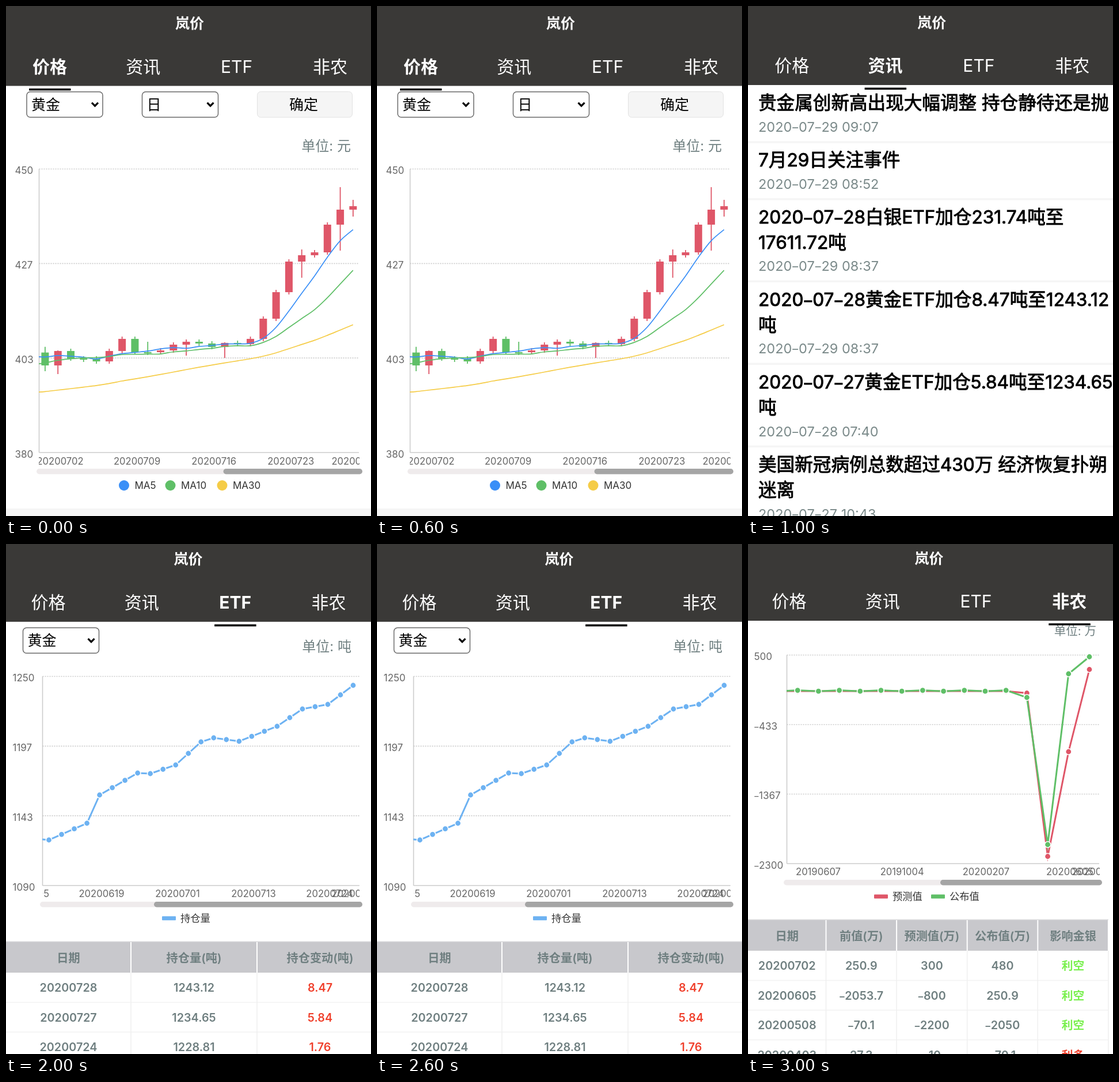
Recreate the animation shown at these times as an HTML page. Size 634 px wide and 884 px high, loop 4000 ms.

```html
<!DOCTYPE html>
<html lang="zh-CN">
<head>
<meta charset="utf-8">
<style>
html, body { margin: 0; width: 100%; height: 100%; overflow: hidden; background: #fff; }
svg { display: block; }
text { font-family: Inter, "Noto Sans CJK SC", "Noto Sans CJK", sans-serif; white-space: pre; }
.dash { font-family: "Open Sans", sans-serif; }
</style>
</head>
<body>
<svg id="stage" width="634" height="884" viewBox="0 0 634 884"></svg>
<script>
const RED = '#df5668', GREEN = '#5fbf67', BLUE = '#3a8ff7', YELLOW = '#f5cc47', SKY = '#6db2f2';
const SLATE = '#6f7f80', AXIS = '#666';

const range = (n, f) => Array.from({ length: n }, (_, i) => f(i));

// y is the baseline; hyphens are set as wider dashes
const text = (x, y, s, size, fill = '#000', weight = 400, anchor = 'start', extra = '') =>
  `<text x="${x}" y="${y}" font-size="${size}" fill="${fill}" font-weight="${weight}" text-anchor="${anchor}" ${extra}>` +
  `${String(s).replace(/-/g, '<tspan class="dash">–</tspan>')}</text>`;
const mid = (x, y, s, size, fill, weight) => text(x, y, s, size, fill, weight, 'middle');
const rect = (x, y, w, h, fill, r = 0, extra = '') =>
  `<rect x="${x}" y="${y}" width="${w}" height="${h}" rx="${r}" fill="${fill}" ${extra}/>`;
const path = (d, stroke, w, extra = '') =>
  `<path d="${d}" fill="none" stroke="${stroke}" stroke-width="${w}" ${extra}/>`;
const clip = (a, b, body) =>
  `<svg x="${a}" width="${b - a}" height="884" viewBox="${a} 0 ${b - a} 884">${body}</svg>`;

function header(active, dx, dy) {
  const tabs = ['价格', '资讯', 'ETF', '非农'].map((s, i) =>
    mid(76 + 162.3 * i + dx, 115.5 + dy, s, 30, '#fff', i == active ? 700 : 400));
  return rect(0, 0, 634, 138.5 + dy, '#3a3937') + mid(319 + dx, 39 + dy, '岚价', 25, '#fff', 700) +
    tabs.join('') + rect(40 + 162.3 * active + dx, 143 + dy, 72.5, 3.5, '#000');
}

const select = (x, y, s) =>
  rect(x, y, 132, 44, '#fff', 6, 'stroke="#6b6b6b" stroke-width="1.5"') + text(x + 8, y + 31, s, 25) +
  path(`M${x + 113} ${y + 19}l5.5 5.5l5.5 -5.5`, '#000', 3.2);

// plot frame: left axis, dotted grid, bottom axis, value labels
function frame(left, right, top, bottom, labelX, labels) {
  const step = (bottom - top) / 3;
  return labels.map((s, i) => {
    const y = top + step * i;
    return path(`M${left} ${y}H${right}`, '#ccc', 1.6, i < 3 ? 'stroke-dasharray="2 2"' : '') +
      text(labelX, y + 8.8, s, 17, AXIS);
  }).join('') + path(`M${left} ${top}V${bottom}`, '#ccc', 1.6);
}

// date labels at even steps, the last one pushed against the right edge
const dates = (left, right, y, first, step, list) =>
  clip(left, right, list.map((s, i) =>
    mid(i < list.length - 1 ? first + step * i : right - 8, y, s, 16.6, AXIS)).join(''));

const scrollbar = (y, left, thumb, right) =>
  rect(left, y, right - left, 9.5, '#efebec', 4.7) + rect(thumb, y, right - thumb, 9.5, '#a5a5a5', 4.7);

const points = (ys, last, step) => ys.map((y, i) => [last - step * (ys.length - 1 - i), y]);

function smooth(ys, color) {
  const p = points(ys, 602.8, 22.29), at = i => p[Math.max(0, Math.min(p.length - 1, i))];
  let d = 'M' + p[0];
  for (let i = 0; i < p.length - 1; i++) {
    const [a, b, c, e] = [at(i - 1), at(i), at(i + 1), at(i + 2)];
    d += `C${b.map((v, k) => v + (c[k] - a[k]) / 6)} ${c.map((v, k) => v - (e[k] - b[k]) / 6)} ${c}`;
  }
  return path(d, color, 1.7);
}

const series = (ys, last, step, color) => {
  const p = points(ys, last, step);
  return path('M' + p.join('L'), color, 3, 'stroke-miterlimit="10"') +
    p.map(([x, y]) => `<circle cx="${x}" cy="${y}" r="5.2" fill="${color}" stroke="#fff" stroke-width="1.6"/>`).join('');
};

// straight runs between [index, y] knots, one value per index
const between = knots => knots.slice(1).reduce((ys, [i, y], k) => {
  const [i0, y0] = knots[k];
  return ys.concat(range(i - i0, n => y0 + (y - y0) * (n + 1) / (i - i0)));
}, [knots[0][1]]);

const key = (x, y, s, color) => rect(x, y - 9.5, 24, 7, color, 1) + text(x + 32, y, s, 17.3, '#333');

function table(top, first, width, heads, rows, colorOf) {
  const edges = [0, ...heads.map((_, i) => first + width * i)], right = edges[heads.length];
  const center = i => (edges[i] + edges[i + 1]) / 2;
  let out = rect(0, top - 1, right, 54, '#c8c8cc') + rect(0, top - 1.5, right, 1.5, '#dadadc');
  heads.forEach((s, i) => out += mid(center(i), top + 34.5, s, 20.2, SLATE, 600));
  rows.forEach((row, r) => {
    const y = top + 53 + 51.5 * r;
    out += path(`M0 ${y + 51.5}H${right}`, '#f2f2f2', 1.5);
    row.split(' ').forEach((s, i) => out += mid(center(i), y + 33, s, 19.8, colorOf(i, r), 600));
  });
  edges.slice(1).forEach(x => out += path(`M${x} ${top}v53`, '#fff', 2) + path(`M${x} ${top + 53}V884`, '#efefef', 1.5));
  return out;
}

function prices() {
  // closing heights; earlier days follow a gentle hump, and all averages come from these
  const closes = [623, 598, 611, 611, 616, 598, 577, 600, 600, 597, 587, 582, 585, 591, 584,
    586, 577, 542, 496, 443, 432, 427, 379, 353, 347];
  const close = i => i < 0 ? 600 + 113 * Math.sin(Math.PI * i / 42) ** 2 : closes[i];
  const average = n => range(26, i => range(n, k => close(i - 1 - k)).reduce((a, b) => a + b) / n);
  // long wicks: day -> [above, below]
  const wicks = { 0: [10, 10], 1: [1, 15], 8: [18, 3], 11: [4, 19], 14: [1, 19], 20: [10, 28], 23: [39, 45], 24: [11, 12] };
  const bars = closes.map((c, i) => {
    const o = close(i - 1), x = 67.9 + 22.29 * i, color = c < o ? RED : GREEN;
    const top = Math.min(o, c), bottom = Math.max(o, c, top + 2), [up, down] = wicks[i] || [4, 4];
    return path(`M${x} ${top - up}V${bottom + down}`, color, 1.8) + rect(x - 6.5, top, 13, bottom - top, color);
  }).join('');
  const legend = [[205, 'MA5', BLUE], [285.5, 'MA10', GREEN], [375.5, 'MA30', YELLOW]].map(([x, s, c]) =>
    `<circle cx="${x}" cy="831" r="9" fill="${c}"/>` + text(x + 18.5, 837, s, 17, '#333')).join('');
  return rect(0, 871, 634, 13, '#f5f5f5') + header(0, 0, 0) +
    select(36, 148.7, '黄金') + select(236.5, 148.7, '日') +
    rect(436.5, 148.5, 165, 44.5, '#f5f5f5', 6, 'stroke="#e2e2e2"') + mid(517, 180, '确定', 25) +
    text(599, 250.5, '单位: 元', 24, SLATE, 400, 'end') +
    frame(57.5, 613, 282.5, 774, 15.5, [450, 427, 403, 380]) +
    clip(57, 614, bars + smooth(average(5), BLUE) + smooth(average(10), GREEN) + smooth(average(30), YELLOW)) +
    dates(57, 614, 794.5, 94, 133.6, [20200702, 20200709, 20200716, 20200723, 20200729]) +
    scrollbar(802, 53, 377.5, 619) + legend;
}

function news() {
  const items = [
    [['贵金属创新高出现大幅调整 持仓静待还是抛'], '2020-07-29 09:07'],
    [['7月29日关注事件'], '2020-07-29 08:52'],
    [['2020-07-28白银ETF加仓231.74吨至', '17611.72吨'], '2020-07-29 08:37'],
    [['2020-07-28黄金ETF加仓8.47吨至1243.12', '吨'], '2020-07-29 08:37'],
    [['2020-07-27黄金ETF加仓5.84吨至1234.65', '吨'], '2020-07-28 07:40'],
    [['美国新冠病例总数超过430万 经济恢复扑朔', '迷离'], '2020-07-27 10:43']];
  let y = 179.3, out = header(1, .3, -1.5);
  for (const [lines, time] of items) {
    lines.forEach((s, i) =>
      out += text(18, y + 43.6 * i, s, 31.6, '#000', 400, 'start', 'stroke="#000" stroke-width=".9"'));
    const end = y + 43.6 * (lines.length - 1);
    out += text(18, end + 38.8, time, 23.5, '#7b8a8a') + rect(0, end + 55, 634, 3.5, '#f5f5f5');
    y += 54.5 + 44.3 * lines.length;
  }
  return out;
}

function holdings() {
  const ys = between([[-1, 511], [0, 513], [3, 484], [4, 435], [7, 397], [8, 398], [10, 383],
    [12, 343], [13, 336], [15, 342], [18, 316], [20, 286], [22, 278], [24, 245]]);
  return header(2, -2.5, -3.7) + select(29.5, 145.2, '黄金') +
    text(600, 186, '单位: 吨', 24, SLATE, 400, 'end') +
    frame(63.5, 614, 229.5, 592, 11.5, [1250, 1197, 1143, 1090]) +
    clip(63, 614, series(ys, 603, 22.02, SKY)) +
    dates(64, 614, 612, 34, 132, [20200605, 20200619, 20200701, 20200713, 20200724, 20200728]) +
    scrollbar(620, 59, 257, 619) + key(271, 654.7, '持仓量', SKY) +
    table(690, 217, 219, ['日期', '持仓量(吨)', '持仓变动(吨)'],
      ['20200728 1243.12 8.47', '20200727 1234.65 5.84', '20200724 1228.81 1.76'],
      i => i == 2 ? '#f0402c' : SLATE);
}

function payrolls() {
  const forecast = [...range(12, () => 255), 258.5, 541.5, 360, 217.5];
  const actual = [...range(12, i => i % 2 ? 253.6 : 255.2), 266, 521, 225, 195.5];
  return text(605, 157.5, '单位: 万', 20.5, SLATE, 400, 'end') + header(3, -4.6, -5.5) +
    frame(67.5, 610, 192.5, 554, 10.5, ['500', '-433', '-1367', '-2300']) +
    clip(67, 611, series(forecast, 593, 36.2, RED) + series(actual, 593, 36.2, GREEN)) +
    dates(67, 611, 574.3, 122, 145.7, [20190607, 20191004, 20200207, 20200605, 20200702]) +
    scrollbar(582, 62, 334, 615) + key(219, 617, '预测值', RED) + key(318, 617, '公布值', GREEN) +
    table(652, 135.5, 122.6, ['日期', '前值(万)', '预测值(万)', '公布值(万)', '影响金银'],
      ['20200702 250.9 300 480 利空', '20200605 -2053.7 -800 250.9 利空',
       '20200508 -70.1 -2200 -2050 利空', '20200403 27.3 -10 -70.1 利多'],
      (i, r) => i < 4 ? SLATE : r < 3 ? '#79f04e' : '#f0402c');
}

const stage = document.getElementById('stage');
stage.innerHTML = [prices, news, holdings, payrolls].map(draw => `<g>${draw()}</g>`).join('');
const scenes = [...stage.children], start = performance.now();

function tick() {
  const now = Math.floor((performance.now() - start) / 1000) % scenes.length;
  scenes.forEach((g, i) => g.style.display = i == now ? '' : 'none');
  requestAnimationFrame(tick);
}
tick();
</script>
</body>
</html>
```
